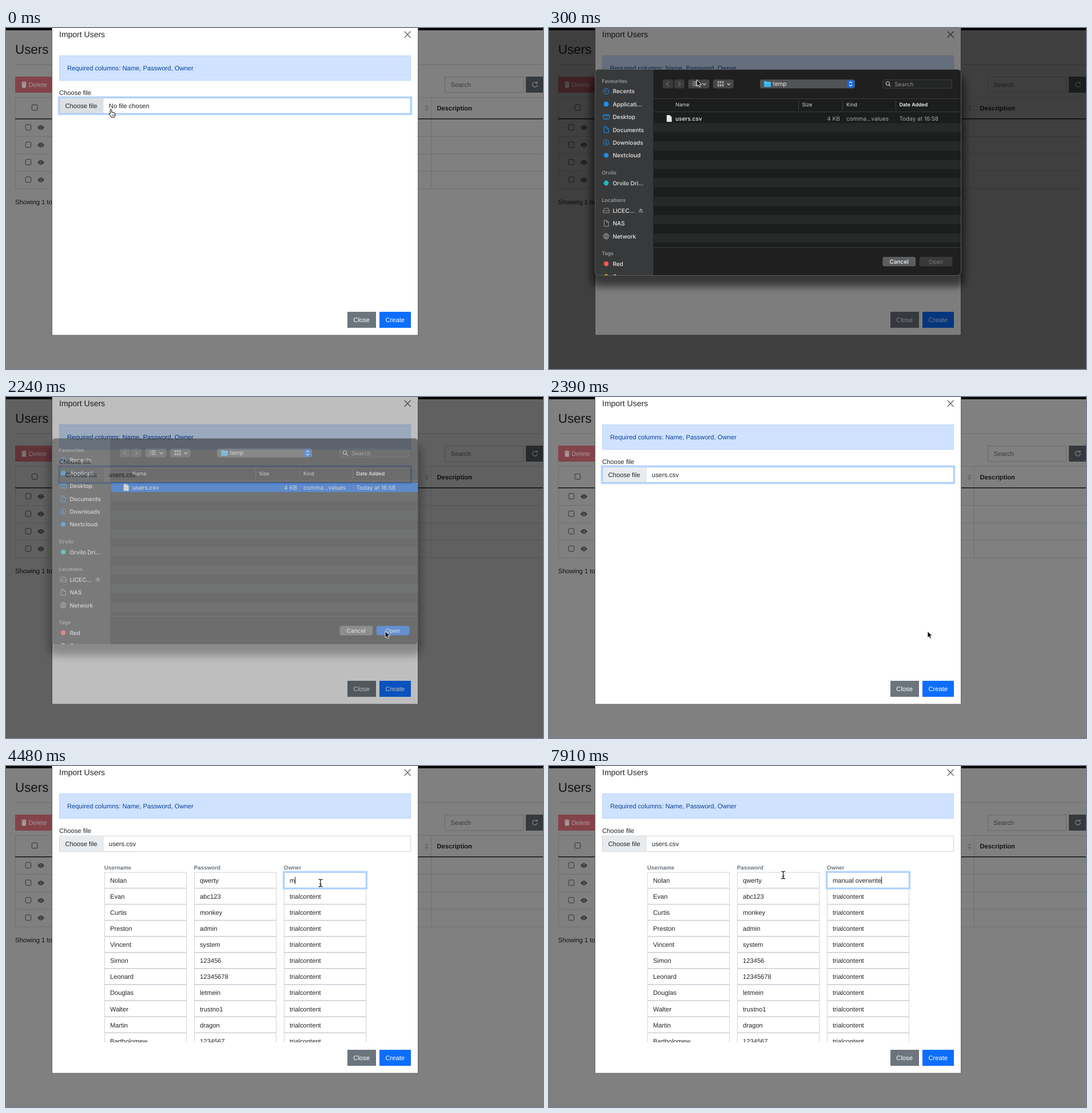
Animation, 939 px wide and 596 px high, one loop 8000 ms. Source, as an HTML page:

```html
<!DOCTYPE html>
<html lang="en">
<head>
<meta charset="utf-8">
<title>Import Users</title>
<style>
  html, body { margin: 0; width: 100%; height: 100%; overflow: hidden; background: #808080; }
  svg { display: block; width: 100%; height: 100%; }
  text { white-space: pre; text-rendering: geometricPrecision; }
  .web { font: 11.2px "Liberation Sans", Arial, sans-serif; }
  .mac { font: 10px Inter, "Open Sans", sans-serif; }
</style>
</head>
<body>
<svg id="stage" viewBox="0 0 939 596" xmlns="http://www.w3.org/2000/svg"></svg>
<script>
const LOOP = 8000;
const TICK = 149.25; // the pointer is sampled at this rate

const rect = (x, y, w, h, fill, more = "") =>
  `<rect x="${x}" y="${y}" width="${w}" height="${h}" fill="${fill}" ${more}/>`;
const text = (x, y, s, fill, more = "") =>
  `<text x="${x}" y="${y}" fill="${fill}" ${more}>${s}</text>`;
const line = (d, color, width = 1, more = "") =>
  `<path d="${d}" fill="none" stroke="${color}" stroke-width="${width}" ${more}/>`;
const dot = (x, y, r, fill, more = "") =>
  `<circle cx="${x}" cy="${y}" r="${r}" fill="${fill}" ${more}/>`;
const stroke = (color, width = 1) => `stroke="${color}" stroke-width="${width}"`;
const size = (px, weight = 400) => `style="font-size:${px}px;font-weight:${weight}"`;
const group = (id, body, more = "") => `<g id="${id}" ${more}>${body}</g>`;

function page() {
  const grid = "#6e7072", ink = "#111315";
  const box = (x, y) => rect(x, y, 9.6, 9.6, "none", `rx="2" ${stroke("#303336", 1)}`);
  const eye = (x, y) =>
    `<path d="M${x - 5.6} ${y}Q${x} ${y - 8} ${x + 5.6} ${y}Q${x} ${y + 8} ${x - 5.6} ${y}Z" fill="#25282b"/>` +
    dot(x, y, 2.6, "#808080") + dot(x, y, 1.6, "#25282b");
  const rows = [173.5, 204, 234.5, 265].map(y =>
    box(34.2, y - 4.8) + eye(61, y + .5) + line(`M16 ${y + 16}H939`, grid)).join("");
  return rect(0, 0, 939, 596, "#808080") + rect(0, 0, 939, 4, "#050506") +
    text(16, 44.5, "Users", ink, size(22.4)) +
    line("M16 64H939", "#6d6d6d") +
    rect(16, 85, 80, 28, "#84434a") +
    `<path d="M27 94.5h9v1.4h-9zM30 93.4h3v1.2h-3zM27.7 96.6h7.6l-.5 8h-6.6z" fill="#a49a9b"/>` +
    text(39.5, 103, "Delete", "#a49a9b") +
    rect(767.4, 85.4, 137, 27.4, "#808080", stroke("#65686b", .9)) +
    text(777.5, 103, "Search", "#393c3f") +
    rect(909, 85, 30, 28, "#363a3e") +
    line("M927.6 95.8A4.2 4.2 0 1 0 929 98.6", "#8a8c8e", 1.1) +
    `<path d="M925.4 96.8h3.9v-3.9z" fill="#8a8c8e"/>` +
    line("M16.5 121V281M743.5 121V281M16 121.5H939", grid) +
    box(45.2, 134.2) + rows +
    line("M16 158.7H939", "#111315", 1.5) +
    `<path d="M732 139.3l3.5-4.6 3.5 4.6zM732 141.3l3.5 4.6 3.5-4.6z" fill="#68696a"/>` +
    text(753.4, 144, "Description", ink, size(11.2, 700)) +
    text(16, 307.5, "Showing 1 to", ink);
}

const users = ["Nolan", "Evan", "Curtis", "Preston", "Vincent", "Simon",
  "Leonard", "Douglas", "Walter", "Martin", "Bartholomew"];
const passwords = ["qwerty", "abc123", "monkey", "admin", "system", "123456",
  "12345678", "letmein", "trustno1", "dragon", "1234567"];
const OWNER = "trialcontent";
const owners = users.map((_, i) => i ? OWNER : "");

function table() {
  const column = (x, title, values) =>
    text(x - .2, 181.4, title, "#6c757d", size(9.8, 700)) +
    values.map((v, i) => {
      const y = 186 + 28.07 * i;
      return rect(x + .4, y, 143.2, 27.2, "#fff", stroke("#ced4da", 1)) +
        text(x + 10, y + 18, v, "#212529");
    }).join("");
  return `<g clip-path="url(#scroll)">` +
    column(172, "Username", users) + column(329, "Password", passwords) +
    column(486, "Owner", owners) +
    group("ownerFocus",
      rect(485, 184.6, 146, 30, "none", stroke("#c2dbfe", 2.8)) +
      rect(486.4, 186, 143.2, 27.2, "#fff", stroke("#86b7fe", 1))) +
    rect(495.6, 193.5, 59, 13, "#b3d7ff", `id="selection"`) +
    text(496, 204, "", "#212529", `id="owner"`) +
    rect(0, 193.7, .9, 12.6, "#000", `id="caret"`) + `</g>`;
}

function modal() {
  const button = (x, w, label, fill, tx) =>
    rect(x, 496, w, 28, fill) + text(tx, 514.2, label, "#fff");
  return rect(80.5, -10, 640, 547, "#fff", stroke("#666", 1)) +
    text(93, 16.4, "Import Users", "#212529", size(14)) +
    line("M697 6.2l10.2 10.2M707.2 6.2l-10.2 10.2", "#666", 1.4, `stroke-linecap="round"`) +
    rect(93.4, 48.4, 614.2, 43.2, "#cfe2ff", stroke("#b6d4fe", .9)) +
    text(107, 73.8, "Required columns: Name, Password, Owner", "#084298") +
    text(93, 117.3, "Choose file", "#212529") +
    rect(92, 120.6, 617, 30.4, "none", `id="fileRing" ${stroke("#c2dbfe", 2.8)}`) +
    rect(93.4, 122.2, 614.2, 27.2, "#fff", `id="fileBox" ${stroke("#ced4da", 1)}`) +
    rect(93.9, 122.7, 75.6, 26.2, "#e9ecef", `id="fileButton"`) +
    line("M169.8 122.5V149", "#ced4da", .9) +
    text(103.4, 139.6, "Choose file", "#212529") +
    text(179.8, 139.6, "", "#212529", `id="fileName"`) +
    group("table", table()) +
    button(597, 50, "Close", "#6c757d", 607.3) +
    button(653, 55, "Create", "#0d6efd", 663.4);
}

function sidebar() {
  const blue = "#1a8ff0", grey = "#9a9a9c";
  const heading = (y, s) => text(92.4, y + 3.2, s, "#9a9a9c", size(8.8, 600));
  const item = (y, s, icon) => icon + text(111.4, y + 3.7, s, "#e9e9ea", size(10, 500));
  const sheet = (y, c) =>
    line(`M96.5 ${y - 5}h4.6l3.2 3.2v7h-7.8zM101 ${y - 5}v3.3h3.3`, c, 1);
  const ring = (y, r, c) => dot(100, y, r, "none", stroke(c));
  return heading(92.3, "Favourites") +
    item(110.5, "Recents", ring(110.5, 4.9, blue) + line("M100 107.4v3.3h-2.4", blue)) +
    item(133, "Applicati...", dot(100, 133, 4.4, blue)) +
    item(155.4, "Desktop", rect(94.7, 151.2, 10.8, 8.4, "none", `rx="1.2" ${stroke(blue)}`) +
      line("M95 153.4h10.4", blue, 1.4) + line("M97.5 157.6h5.4", blue, 1)) +
    item(177.8, "Documents", sheet(177.8, blue)) +
    item(200.2, "Downloads", ring(200.2, 4.9, blue) +
      line("M100 197.2v5.2M97.8 200.4l2.2 2.2 2.2-2.2", blue)) +
    item(222.6, "Nextcloud", dot(100, 222.5, 4, blue)) +
    heading(253, "Orvilo") +
    item(271, "Orvilo Dri...", dot(100, 271, 4.4, "#22b8bd")) +
    heading(301, "Locations") +
    item(319, "LICEC...", line("M94.8 319.4l2-4.4h6.6l2 4.4v3.6H94.8zM94.8 319.4h10.6", grey, .9)) +
    `<path d="M156.6 319.6l4-4.4 4 4.4zM156.6 320.8h8v1.4h-8z" fill="#8a8a8c"/>` +
    item(341.4, "NAS", sheet(341.4, grey)) +
    item(364, "Network", ring(364, 4.8, grey) +
      line("M95.2 364h9.6M100 359.2v9.6M96.2 361.4h7.6M96.2 366.6h7.6", grey, .7) +
      `<ellipse cx="100" cy="364" rx="2.3" ry="4.8" fill="none" ${stroke(grey, .7)}/>`) +
    heading(394, "Tags") +
    item(412, "Red", dot(100, 412, 4.2, "#ff5650")) +
    item(434.4, "Orange", dot(100, 434.4, 4.2, "#fbb02d"));
}

function dialog() {
  const pill = (x, w, fill, y = 90, h = 15.4) =>
    rect(x, y, w, h, fill, `rx="3.4"`);
  const chevron = (x, y) => line(`M${x} ${y}l2.7 2.7 2.7-2.7`, "#d4d4d4", 1.2);
  let stripes = "", icons = "";
  for (let i = 0; i < 13; i += 2) stripes += rect(183, 166.2 + i * 16.08, 538, 16.08, "#272929");
  for (let i = 0; i < 3; i++) {
    const y = 94.4 + i * 3.2, x = 294.6 + i * 4;
    icons += line(`M251 ${y}h1.6M254 ${y}h7.5`, "#d4d4d4", 1.1) +
      line(`M${x} 93.6h2.8M${x} 95.6h2.8M${x} 98.8h2.8M${x} 101h2.8`, "#d4d4d4", 1.3);
  }
  const heads = [[221, "Name"], [442.4, "Size"], [520, "Kind"]]
    .map(([x, s]) => text(x, 137.3, s, "#dcdcdc", size(8.8))).join("");
  return rect(74, 84, 653, 368, "#000", `rx="14" opacity=".55" filter="url(#soft)"`) +
    `<g clip-path="url(#window)">` +
    rect(80, 72, 641, 361, "#1c1d1d") + rect(80, 72, 103, 361, "#38393a") +
    rect(183, 72, 538, 51, "#1f1f1f") + rect(183, 384, 538, 49, "#1f1f1f") +
    stripes + rect(183, 150, 538, 16.2, "#0058d6", `id="picked"`) +
    line("M183 123.5H721M183 146.5H721M183 383.5H721", "#3a3b3b") +
    line("M436.5 126V144M513.5 126V144M606.5 126V144", "#3d3e3e") +
    line("M183 72V433", "#151515", .8) + sidebar() + `</g>` +
    pill(199, 18, "#3b3c3c") + pill(218.8, 18, "#3b3c3c") +
    line("M209.4 94l-3.6 3.8 3.6 3.8M226 94l3.6 3.8-3.6 3.8", "#777", 1.2) +
    pill(243.4, 36.8, "#454646") + pill(286.8, 36, "#454646") + icons +
    chevron(268.8, 96.6) + chevron(311.6, 96.6) +
    pill(369, 166, "#525354") + pill(521, 13, "#1765dc", 91, 13.4) +
    line("M525 96.3l2.5-2.5 2.5 2.5M525 99.2l2.5 2.5 2.5-2.5", "#fff", 1.2) +
    `<path d="M376 94q0-1.2 1.2-1.2h3l1.4 1.3h5.2q1.2 0 1.2 1.2v6.4q0 1.2-1.2 1.2h-9.6q-1.2 0-1.2-1.2z" fill="#35b4f0"/>` +
    line("M376.4 96h11.2", "#7ad2fa", .9) +
    text(391.5, 101.4, "temp", "#eee") +
    rect(583.4, 90.4, 121, 15, "#242525", `rx="3.4" ${stroke("#414242", .9)}`) +
    dot(592.4, 97, 3, "none", stroke("#c8c8c8", 1.1)) + line("M594.7 99.4l2.8 3", "#c8c8c8", 1.2) +
    text(604.2, 101.6, "Search", "#8f8f90") + heads +
    text(612.4, 137.3, "Date Added", "#f2f2f2", size(8.8, 600)) +
    `<path d="M205.8 152.2h5.6l3.2 3.2v8.6h-8.8z" fill="#eee"/><path d="M211.4 152.2v3.2h3.2z" fill="#aaa"/>` +
    line("M207.6 158.6h5M207.6 161.4h5", "#c4c4c4", .8) +
    text(221, 162, "users.csv", "#eee", size(10, 500)) +
    `<g id="details">` + text(508.8, 162, "4 KB", "inherit", `text-anchor="end"`) +
    text(520, 162, "comma...values", "inherit") +
    text(612.4, 162, "Today at 16:58", "inherit") + `</g>` +
    pill(583.4, 57.8, "#5c5e60", 400, 16.4) +
    text(612.2, 411.6, "Cancel", "#f2f2f2", `text-anchor="middle" ${size(10, 500)}`) +
    rect(647.6, 400, 57.8, 16.4, "#383939", `rx="3.4" id="openButton"`) +
    text(676.5, 411.6, "Open", "#777", `text-anchor="middle" id="openLabel"`) +
    rect(80.5, 72.5, 640, 360, "none", `rx="7" ${stroke("#5b5c5c", 1)}`);
}

const pointers =
  group("arrow", `<path d="M0 0V11.2L2.6 8.9 4.3 12.9 6.3 12 4.6 8.1H8.1Z" fill="#000" ${stroke("#fff", .9)}/>`) +
  group("beam",
    line("M-3.5-6.5Q0-6.5 0-4.5V4.5Q0 6.5-3.5 6.5M3.5-6.5Q0-6.5 0-4.5V4.5Q0 6.5 3.5 6.5M-1.8 2H1.8", "#fff", 2.4) +
    line("M-3.5-6.5Q0-6.5 0-4.5V4.5Q0 6.5-3.5 6.5M3.5-6.5Q0-6.5 0-4.5V4.5Q0 6.5 3.5 6.5M-1.8 2H1.8", "#000", 1.1)) +
  group("hand",
    `<path d="M-1.3 7.6V.9Q-1.3-.6 0-.6T1.3.9V5Q2.4 4 3.4 5.2 4.6 4.4 5.5 5.7 7.4 5.2 7.4 7.2V9.6Q7.2 11.6 6 13.6H.4Q-.6 11.4-3 8.8-3.8 7.2-2.4 7Z" fill="#fff" ${stroke("#000", 1)}/>` +
    line("M1.8 8.4v3M3.6 8.4v3M5.2 8.4v3", "#000", .6));

const stage = document.getElementById("stage");
stage.innerHTML = `<defs>
  <filter id="soft" x="-10%" y="-15%" width="120%" height="130%"><feGaussianBlur stdDeviation="7"/></filter>
  <clipPath id="window"><rect x="80" y="72" width="641" height="361" rx="7.5"/></clipPath>
  <clipPath id="scroll"><rect x="150" y="165" width="520" height="318"/></clipPath></defs>` +
  group("web", page() + modal(), `class="web"`) +
  rect(0, 0, 939, 596, "#000", `id="dim"`) +
  group("dialog", dialog(), `class="mac"`) + group("pointer", pointers);

const el = {};
stage.querySelectorAll("[id]").forEach(node => el[node.id] = node);
const show = (node, on) => node.style.display = on ? "" : "none";
const set = (node, name, value) => node.setAttribute(name, value);

// [tick, x, y]
const path = [[0, 183.5, 142.5], [1, 222, 118], [2, 258.5, 90.5], [3, 261, 104], [5, 262, 146],
  [6, 262, 156], [8, 262, 157], [9, 292, 188], [12, 610, 375], [13, 658, 405], [14, 664, 409.5],
  [16, 662, 409.5], [17, 661, 406], [19, 622, 330], [22, 562, 222], [23, 552, 207], [24, 550, 204.5],
  [48, 550, 204.5], [49, 592, 192], [50, 625, 150], [51, 510, 126], [52, 393, 160], [53, 409.5, 190.5]];

function pointerAt(n) {
  const i = path.findIndex(p => p[0] >= n);
  if (i < 0) return path[path.length - 1].slice(1);
  const b = path[i], a = path[Math.max(0, i - 1)];
  const k = b[0] === a[0] ? 1 : (n - a[0]) / (b[0] - a[0]);
  return [a[1] + (b[1] - a[1]) * k, a[2] + (b[2] - a[2]) * k];
}

// [time, letters typed]
const typing = [[4480, 1], [4630, 2], [4780, 3], [4920, 4], [5070, 6], [5220, 7], [5520, 8],
  [5670, 9], [5820, 11], [6270, 12], [6420, 13], [6570, 14], [6710, 16]];

function ownerText(t) {
  let count = 0;
  for (const [at, letters] of typing) if (t >= at) count = letters;
  return count ? "manual overwrite".slice(0, count) : OWNER;
}

function draw(t) {
  const open = t < 150 || t >= 2390 ? 0 : t < 2240 ? 1 : .5;
  set(el.dim, "opacity", open * .51);
  set(el.dialog, "opacity", open);

  const picked = t >= 1040;
  show(el.picked, picked);
  set(el.details, "fill", picked ? "#e4ecf8" : "#a4a5a5");
  set(el.openButton, "fill", picked ? "#0f62e0" : "#383939");
  set(el.openLabel, "fill", picked ? "#fff" : "#777");

  const focused = t >= 3590;
  show(el.fileRing, !focused);
  set(el.fileBox, "stroke", focused ? "#ced4da" : "#86b7fe");
  set(el.fileButton, "fill", t < 150 ? "#dde0e3" : "#e9ecef");
  el.fileName.textContent = t < 2240 ? "No file chosen" : "users.csv";

  show(el.table, t >= 2540);
  show(el.ownerFocus, focused);
  show(el.selection, t >= 3740 && t < 4480);
  el.owner.textContent = ownerText(t);
  show(el.caret, t >= 4480);
  if (t >= 4480) set(el.caret, "x", 496 + el.owner.getComputedTextLength());

  const [x, y] = pointerAt(Math.floor((t + 8) / TICK));
  const overField = t >= 2540 && y > 186 && y < 483 &&
    [172, 329, 486].some(left => x > left && x < left + 143);
  show(el.hand, t < 150);
  show(el.beam, overField);
  show(el.arrow, t >= 150 && !overField);
  set(el.pointer, "transform", `translate(${x} ${y})`);
}

const start = performance.now();
function frame() {
  draw((performance.now() - start) % LOOP);
  requestAnimationFrame(frame);
}
frame();
</script>
</body>
</html>
```
